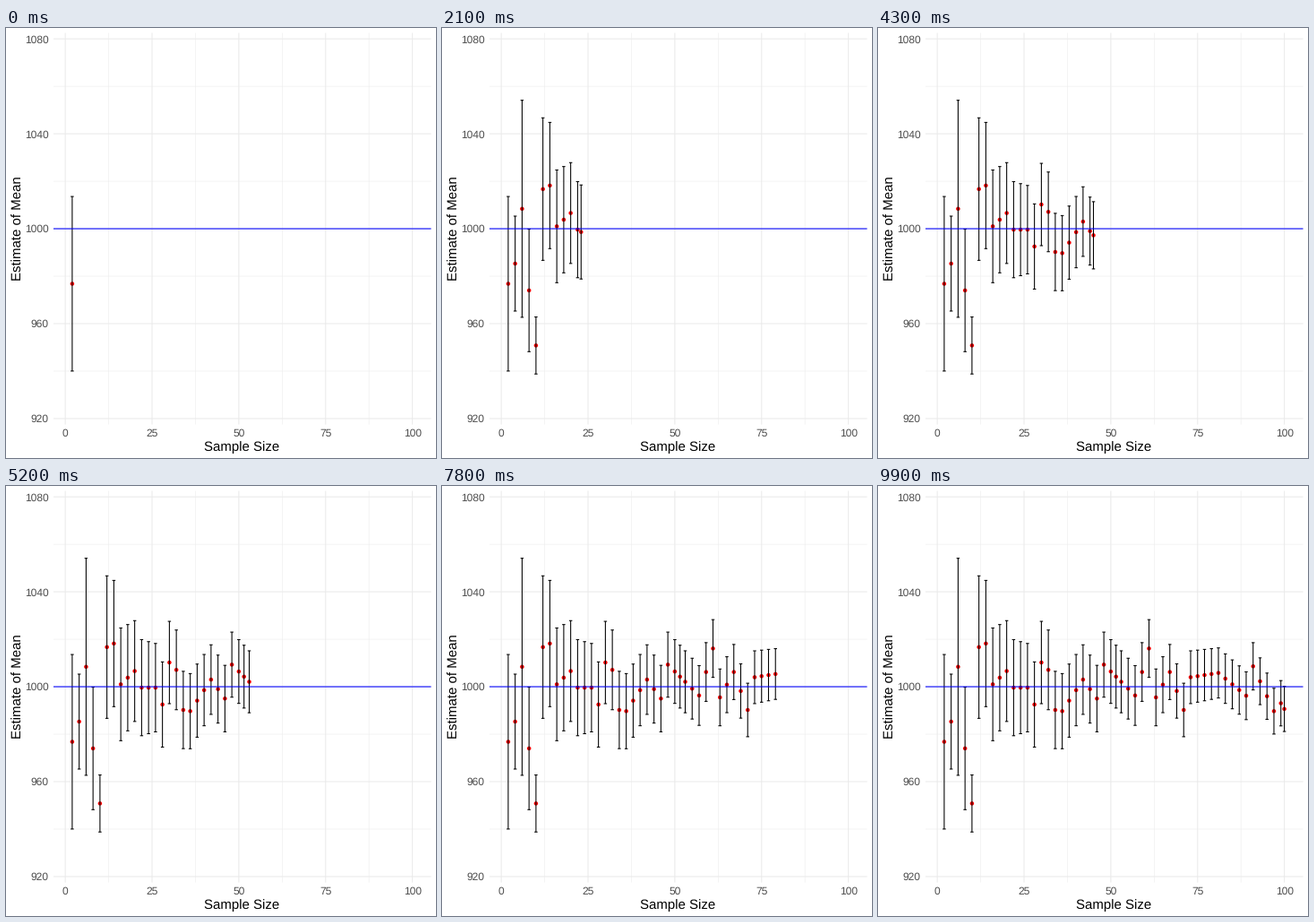
Animation, 480 px wide and 480 px high, one loop 10000 ms. Source, as a matplotlib script:

```python
import matplotlib.pyplot as plt
import numpy as np
from matplotlib.animation import FuncAnimation
from matplotlib.collections import LineCollection

SIZE, DPI = 480, 72              # at 72 dpi one point is one pixel
FRAMES, INTERVAL = 100, 100
LEFT, RIGHT, TOP, BOTTOM = 53, 474.5, 5.5, 442.6
XLIM, YLIM = (-3.395, 105.395), (917.5, 1082.5)
LINE, CAP, DOT = 1.07, 0.45, 4.6
TRUE_MEAN = 1000

# Turning points of the estimate: sample size, offset from the true mean
TURNS = [(2, -23.2), (4, -14.7), (6, 8.4), (8, -26), (10, -49.2), (12, 16.7),
         (14, 18.2), (16, 1), (20, 6.6), (22, -0.4), (26, -0.4), (28, -7.5),
         (30, 10.2), (32, 7.1), (34, -9.8), (36, -10.3), (42, 3), (46, -5),
         (48, 9.3), (57, -3.7), (61, 16.1), (63, -4.5), (67, 6.2),
         (71, -9.8), (73, 4), (81, 5.8), (89, -3.8), (91, 8.6), (97, -10.3),
         (100, -5.3)]
# Spread of the sample, unsteady until it settles
SPREAD = [(2, 52), (4, 40), (6, 112), (8, 73), (10, 38), (12, 104), (16, 95)]

plt.rcParams.update({
    "font.family": "Liberation Sans",
    "text.hinting": "none",
    "toolbar": "None",
})


def make_estimates():
    """Sample size, mean and half interval for every step."""
    step = np.arange(FRAMES)
    # 2..100 spread over the steps, with one half step in the middle
    n = step + 2 - 0.5 * (step >= 50) - 0.5 * (step > 50)
    mean = TRUE_MEAN + np.interp(n, *zip(*TURNS))
    half = np.interp(n, *zip(*SPREAD)) / np.sqrt(n)
    # Estimates that only pass by scatter a little
    noise = np.random.default_rng(7).normal(0, 20, FRAMES) / np.sqrt(n)
    return n, mean + noise * (step % 2), half


N, MEAN, HALF = make_estimates()

fig = plt.figure(figsize=(SIZE / DPI, SIZE / DPI), dpi=DPI, facecolor="white")
ax = fig.add_axes([LEFT / SIZE, 1 - BOTTOM / SIZE,
                   (RIGHT - LEFT) / SIZE, (BOTTOM - TOP) / SIZE])
ax.set(xlim=XLIM, ylim=YLIM)
ax.axis("off")


def px_text(x, y, s, size, color, ha="center", **kw):
    fig.text(x / SIZE, 1 - y / SIZE, s, fontsize=size, color=color,
             ha=ha, va="baseline", **kw)


def to_px(x, y):
    fx = (x - XLIM[0]) / (XLIM[1] - XLIM[0])
    fy = (YLIM[1] - y) / (YLIM[1] - YLIM[0])
    return LEFT + fx * (RIGHT - LEFT), TOP + fy * (BOTTOM - TOP)


def rules(xs, ys, width, color="#ebebeb", zorder=1):
    style = dict(color=color, lw=width, zorder=zorder, snap=False,
                 clip_on=False, solid_capstyle="butt")
    for x in xs:
        ax.axvline(x, **style)
    for y in ys:
        ax.axhline(y, **style)


def segments(color, width, zorder, capstyle):
    lines = LineCollection([], colors=color, linewidths=width,
                           zorder=zorder, capstyle=capstyle)
    lines.set_snap(False)
    return ax.add_collection(lines, autolim=False)


x_ticks, y_ticks = range(0, 101, 25), range(920, 1081, 40)
rules(np.arange(12.5, 100, 25), range(940, 1080, 40), LINE / 2)
rules(x_ticks, y_ticks, LINE)
rules([], [TRUE_MEAN], LINE, "blue", 4)

for t in x_ticks:
    px_text(to_px(t, 0)[0], 456.2, str(t), 12, "#4d4d4d")
for t in y_ticks:
    px_text(47.4, to_px(0, t)[1] + 4.3, str(t), 12, "#4d4d4d", ha="right")
px_text((LEFT + RIGHT) / 2 - 0.5, 471.5, "Sample Size", 15, "black")
px_text(17.7, (TOP + BOTTOM) / 2, "Estimate of Mean", 15, "black",
        rotation=90, rotation_mode="anchor")

# Round-capped specks keep the dots off the pixel grid, unlike markers
dots = segments("red", DOT, 2, "round")
bars = segments("black", LINE, 3, "butt")


def dot(x, y):
    return [(x - 0.01, y), (x + 0.01, y)]


def error_bar(x, y, half):
    ends = y - half, y + half
    caps = [[(x - CAP, end), (x + CAP, end)] for end in ends]
    return [[(x, end) for end in ends], *caps]


def update(step):
    # Every second estimate stays; the current one always shows
    shown = [*range(0, step, 2), step]
    dots.set_segments([dot(N[s], MEAN[s]) for s in shown])
    bars.set_segments([seg for s in shown
                       for seg in error_bar(N[s], MEAN[s], HALF[s])])
    return dots, bars


anim = FuncAnimation(fig, update, frames=FRAMES, interval=INTERVAL,
                     init_func=lambda: update(0), repeat=True,
                     repeat_delay=0, blit=False)
plt.show()
```
